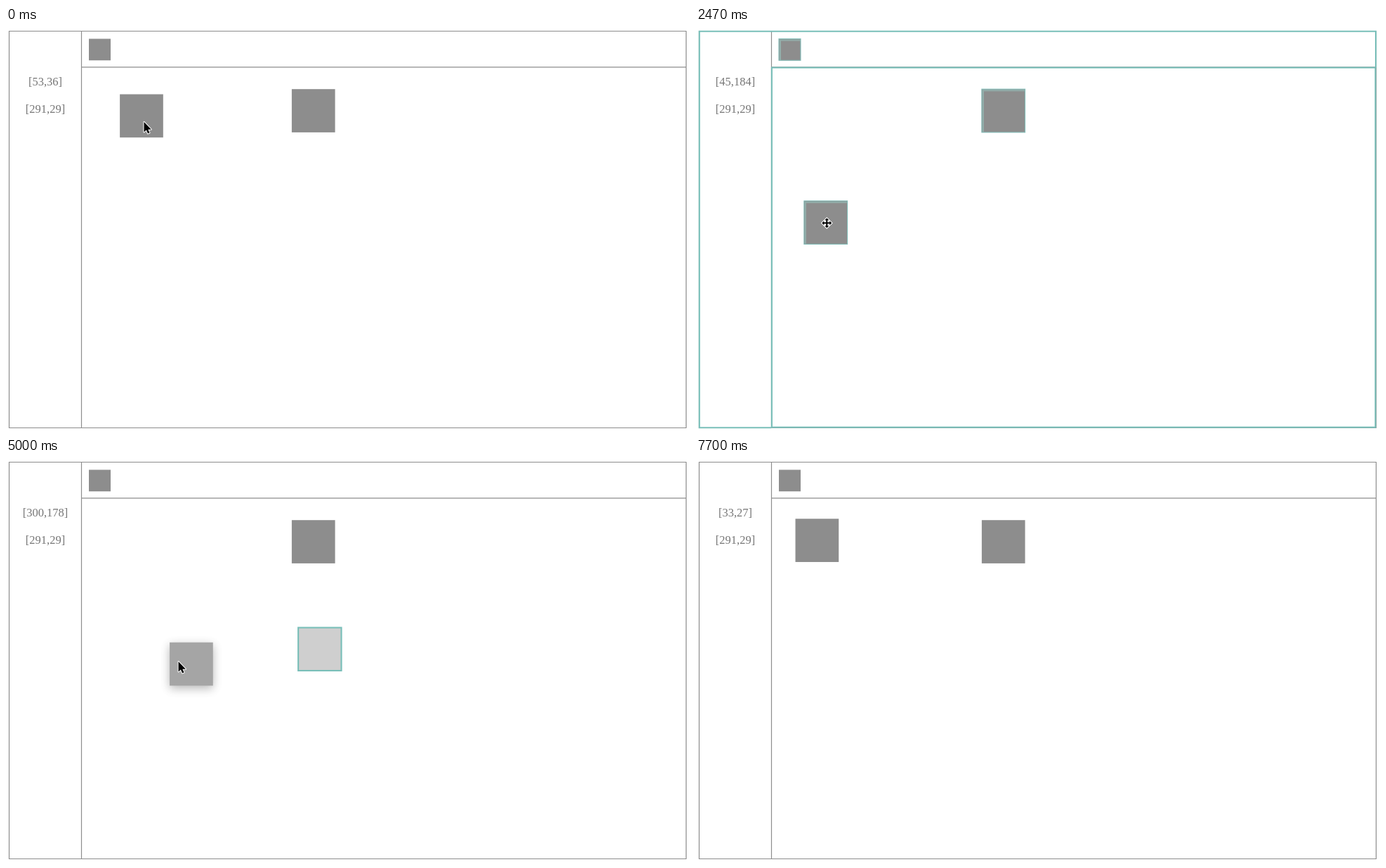
Animation, 974 px wide and 575 px high, one loop 8630 ms. Source, as an HTML page:

```html
<!DOCTYPE html>
<html lang="en">
<head>
<meta charset="utf-8">
<title>Drag and drop</title>
<style>
  html, body { margin: 0; width: 100%; height: 100%; overflow: hidden; background: #fff; }
  svg { display: block; width: 974px; height: 575px; }
  text { font: 16.5px "Liberation Serif", serif; fill: #767676; text-anchor: middle; }
  .box { fill: #8d8d8d; }
  .lines { fill: none; stroke: #8d8d8d; stroke-width: 1.2; }
  .flash { fill: none; stroke: #79bfb9; stroke-width: 2.1; }
  .edge { fill: none; stroke: #80bbb6; stroke-width: 1.1; }
  .band { fill: none; stroke: #91aeaa; stroke-width: 2; }
  .cursor { stroke: #fff; stroke-width: 2; stroke-linejoin: round; paint-order: stroke; }
  #ghost { filter: drop-shadow(0 4px 7px rgba(0, 0, 0, .36)); }
</style>
</head>
<body>
<svg>
  <defs>
    <g id="boxEdge">
      <path class="band" d="M2 61V2H61"/>
      <rect class="edge" width="61.7" height="61.7"/>
    </g>
  </defs>
  <path class="lines" d="M4.5 4.5H968.5V570.5H4.5ZM107.5 4.5V570.5M107.5 55.8H968.5"/>
  <text id="label" x="56" y="81.5"></text>
  <text x="56" y="120.5">[291,29]</text>
  <rect class="box" x="118" y="15.4" width="31" height="30.8"/>
  <rect class="box" x="406.9" y="87.2" width="61.7" height="61.7"/>
  <rect class="box" id="box" width="61.7" height="61.7"/>
  <g id="dropFlash">
    <path class="flash" id="outerFlash" d="M107 570.2H4.8V4.8H968V56"/>
    <rect class="flash" x="107.9" y="56.5" width="859.6" height="513.2"/>
    <path class="band" d="M120 46V17.4H149"/>
    <rect class="edge" x="118" y="15.4" width="31" height="30.8"/>
    <use href="#boxEdge" x="406.9" y="87.2"/>
    <use href="#boxEdge" id="droppedEdge"/>
  </g>
  <rect class="flash" id="pickFlash" width="61.4" height="61.4"/>
  <rect class="box" id="ghost" width="61.7" height="61.7"/>
  <path class="cursor" id="arrow" d="M0 0V14.5L3.3 11.5 5.5 16.6 8 15.6 5.8 10.7H10.3Z"/>
  <g id="move">
    <path fill="#fff" d="M0-8.5L8.5 0 0 8.5-8.5 0Z"/>
    <path d="M0-7L3-4H1V-1H4V-3L7 0 4 3V1H1V4H3L0 7-3 4H-1V1H-4V3L-7 0-4-3V-1H-1V-4H-3Z"/>
  </g>
</svg>
<script>
const LOOP = 8630, SCALE = 1.0285, LAG = 38, GHOST_OPACITY = 0.79;
const FLASH = 270, SETTLE = 100, CENTER = [32.4, 31.6];
const $ = id => document.getElementById(id);
const place = (id, x, y) => $(id).setAttribute('transform', `translate(${x} ${y})`);
const show = (id, on) => { $(id).style.display = on ? '' : 'none'; };
const clamp = u => Math.min(1, Math.max(0, u));
const toStage = ([x, y]) => [107.6 + x * SCALE, 57.5 + y * SCALE];

const smooth = u => u * u * (3 - 2 * u);
const easeOut = power => u => 1 - (1 - u) ** power;

const boxStart = [53, 36];
const pointerStart = [196.5, 134];
const drags = [
  { pick: 1130, drop: 2470, to: [45, 184], ease: easeOut(2), bow: [7, 0] },
  { pick: 2970, drop: 4130, to: [300, 178], ease: smooth },
  { pick: 4760, drop: 5710, to: [32, 172], ease: easeOut(4), bow: [0, 29] },
  { pick: 6200, drop: 7200, to: [33, 27], ease: smooth }
];

// The pointer hovers, ends each drag at the centre of the box, then leaves upwards.
const moves = [
  { begin: 230, end: 630, to: [188, 116.5], ease: smooth },
  ...drags.map(d => ({
    ...d, begin: d.pick, end: d.drop - SETTLE,
    to: toStage(d.to).map((v, axis) => v + CENTER[axis])
  })),
  { begin: 7470, end: 7700, to: [184, -20], ease: smooth }
];

function pointer(t) {
  return moves.reduce((from, { begin, end, to, ease, bow = [0, 0] }) => {
    const p = ease(clamp((t - begin) / (end - begin)));
    return from.map((v, axis) => v + (to[axis] - v) * p + bow[axis] * Math.sin(Math.PI * p));
  }, pointerStart);
}

function render(t) {
  const last = drags.filter(d => t >= d.drop).pop();
  const drag = drags.find(d => t >= d.pick && t < d.drop);
  const coords = last ? last.to : boxStart;
  const [bx, by] = toStage(coords);
  const [px, py] = pointer(t);
  const sinceDrop = last ? t - last.drop : Infinity;

  $('label').textContent = `[${coords}]`;
  place('box', bx, by);
  $('box').style.opacity = drag ? 0.42 : 1;

  show('dropFlash', sinceDrop < FLASH);
  show('outerFlash', sinceDrop < FLASH - 10);
  place('droppedEdge', bx, by);
  show('pickFlash', drag && t < drag.pick + FLASH);
  place('pickFlash', bx, by);

  show('ghost', drag);
  if (drag) {
    const grab = pointer(drag.pick);
    const [gx, gy] = pointer(Math.max(drag.pick, t - LAG));
    place('ghost', bx + gx - grab[0], by + gy - grab[1]);
    $('ghost').style.opacity = GHOST_OPACITY * clamp((t - drag.pick) / 235);
  }

  const arrow = drag || t < 230 || py < 85;
  show('arrow', arrow);
  show('move', !arrow);
  place('arrow', px, py);
  place('move', px, py);
}

function tick() {
  render(performance.now() % LOOP);
  requestAnimationFrame(tick);
}
tick();
</script>
</body>
</html>
```
